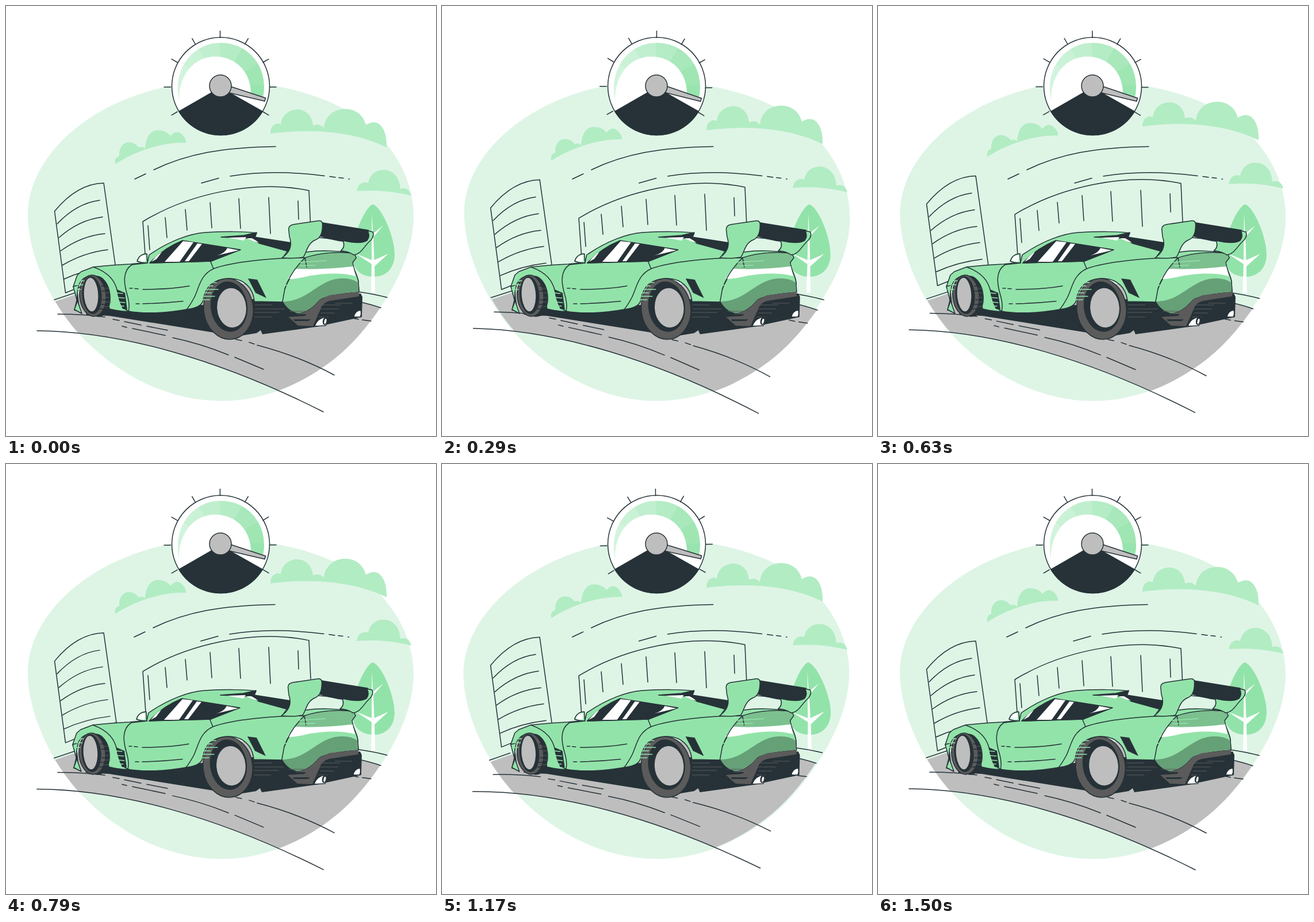
An HTML page for the animation above (1.54 s loop, 748x748 px).

```html
<!DOCTYPE html>
<html lang="en">
<head>
<meta charset="utf-8">
<title>Fast car</title>
<style>
html, body { margin: 0; width: 100%; height: 100%; overflow: hidden; background: #fff; }
svg { display: block; width: 100%; height: 100%; }
.line { fill: none; stroke: #263238; stroke-width: 1.5; stroke-linecap: round; stroke-linejoin: round; }
.edge { stroke: #263238; stroke-width: 1.5; stroke-linejoin: round; }
.dark { fill: #263238; }
.green { fill: #92e3a9; }
.mid { fill: #7cc08f; }
.deep { fill: #66a077; }
.cloud { fill: #b2ecc3; }
.grey { fill: #bebebe; }
.iron { fill: #5b5b5b; }
.white { fill: #fff; }
.glint { fill: none; stroke: #92e3a9; stroke-width: 1.3; stroke-linecap: round; }
.scratch { fill: none; stroke: #5b5b5b; stroke-width: 1.2; stroke-linecap: round; }
</style>
</head>
<body>
<svg viewBox="0 0 748 748">
  <defs>
    <path id="blobShape" d="M38 362C38 290 95 215 190 170C260 138 320 131 376 131C450 131 530 147 590 180C665 221 709 295 709 365C709 420 685 475 651 525C620 570 590 602 552 628C500 664 440 687 374 687C280 687 190 640 125 568C75 512 38 430 38 362Z"/>
    <clipPath id="blobClip"><use href="#blobShape"/></clipPath>
    <clipPath id="bandClip"><path d="M301 166C289 110 325 64 373 64C418 64 449 99 449 140Q449 153 446 163L426 156C428 118 402 88 364 88C326 88 300 121 301 166Z"/></clipPath>
  </defs>

  <use id="blob" href="#blobShape" fill="#def5e6"/>

  <g id="sky">
    <g class="cloud">
      <path d="M190 275Q188 263 197 261C196 247 203 237 214 237Q224 237 231 246Q237 243 242 248C243 226 253 216 264 216Q279 216 286 226Q296 214 306 223Q313 230 313.500 238C275 236 225 252 190 275Z"/>
      <path d="M460 222Q460 208 470 205Q474 203 478 206C480 187 495 180 507 180C520 180 533 190 534 208Q545 203 553 212C555 190 572 179 590 179C608 179 622 190 626 207Q640 198 650 206Q663 218 662 246C600 215 520 214 460 222Z"/>
      <path d="M610 322Q612 309 622 307Q627 306 630 308C633 292 645 285 657 285C672 285 685 297 686 318Q701 314 705 330C670 321 640 320 610 322Z"/>
    </g>
    <g class="line">
      <path d="M190 464L103.500 499L84.500 357Q124 309 170 308L192 464"/>
      <path d="M89 379Q123 343 163 338M92 403Q127 372 168 367M95 426Q131 400 172 396M98 451Q135 429 177 424M101 475Q138 458 181 453"/>
      <path d="M243 446L238 375C315 328 430 301 527 321L530 388"/>
      <path d="M247 382L250 424M277 368L280 403M312 354L315 390M355 342L358 386M405 335L408 387M457 333L460 396M508 339L509 371"/>
    </g>
  </g>

  <g id="tree">
    <path class="green" d="M638 345C654 350 676 402 676 432C676 457 660 471 640 471C616 471 603 457 602 435C602 402 624 350 638 345Z"/>
    <path class="white" d="M636.500 361L638.500 396L656 382L639 402L640.500 442L665 431L641 453L642 499L635 499L636 449L609 431L636 442Z"/>
  </g>

  <g id="road">
    <g clip-path="url(#blobClip)">
      <path class="grey" d="M80 516L118 503Q200 480 374 480Q540 490 660 527L660 640L552 706C372 615 200 566 54 565Z"/>
    </g>
    <g class="line">
      <path d="M84 511L120 499M612 497Q640 501 663 507M612 514Q635 519 652 525"/>
      <path d="M90 536Q135 536 172 541M54 565C200 566 372 615 552 706"/>
      <path d="M186 545L197 547M206 549L235 555M245 557L281 564"/>
      <path d="M202 557L210 559M220 561L277 573M290 577Q338 587 387 607M398 611L448 632"/>
      <path d="M400 580L410 582M423 585L432 588M437 590Q510 609 571 642M603 543L613 545M620 546L635 548"/>
    </g>
  </g>

  <g id="car">
    <g class="line">
      <path d="M224 301L243 292M257 285C315 257 376 246 469 244.500"/>
      <path d="M340 308L370 299.500M390 296Q465 284 554 295.500M563 296.500L573 298M579 298.500L587 299.500M596 301L597.500 301"/>
    </g>

    <path class="dark" d="M135 515L180 524L345 520L430 510L500 514L617 500L620 506L619 541L540 558L446 571L443 564L436 569L400 575L355 567L180 539L140 537Z"/>

    <path class="green edge" d="M124 468L131 462L152 454Q190 450 216 449L246 446L249 433C285 408 320 396 346 394C380 392 420 392 436 395L433 402L490 426L482 437Q505 430 523 428C550 424 585 426 606 431L609 438L603 446C604 459 612 469 613 480L614 498L550 508Q520 520 482 515L432 514C430 490 414 475 391 474C360 473 346 490 343 512C340 522 330 526 313 528C280 534 240 536 213 531C198 532 190 529 180 527L176 505C174 480 162 469 148 470C132 470 125 483 124 500L128 531L119 529L124 508L117 488Z"/>

    <path class="line" d="M152 454C180 464 190 479 194 497Q200 527 214 531M246 447L219 450C202 461 205 483 211 503Q216 520 213 531M356 445L361 457C337 468 336 491 327 508Q320 521 314 528M361 457C393 445 462 438 520 438"/>
    <path class="line" d="M215 491L220 491M224 491.500L230 492M238 493Q285 493 319 487M226 518L232 518M238 518Q275 517 308 513.500"/>

    <path class="green edge" d="M117 488L127 485Q121 505 126 518L132 535L119 528L124 514Z"/>
    <path class="dark" d="M193 493L207 499L211 528L203 527Q195 512 193 493Z"/>
    <path class="glint" d="M191 499L203 500M193 507L206 508M196 515L207 516M199 522L205 522"/>
    <path class="dark" d="M421 474L437 476L453 508L434 499Z"/>

    <!-- cabin -->
    <path class="dark edge" d="M250 447C265 431 285 417 307 408L408 424L357 444Z"/>
    <g class="white">
      <path d="M276 445L308 409L326 411L302 445ZM311 444L333 413L341 414L318 444ZM385 421L405 425L367 434Q381 430 385 421Z"/>
      <path d="M253 445Q263 432 271 428L262 440Z"/>
    </g>
    <path class="line" d="M250 447L357 444"/>
    <path class="dark edge" d="M374 402L414 399L436 394L433 402L497 412L492 427L441 413L425 404Z"/>
    <path class="white" d="M386 403L418 402L414 408ZM419 404L428 404Q434 407 440 412L430 409Z"/>
    <path class="green edge" d="M228 444Q232 431 245 431L246 447Q235 447 228 444Z"/>
    <path class="white" d="M230 443Q233 433 243 433L243 444Q236 446 230 443Z"/>

    <!-- tail -->
    <path class="green edge" d="M520 438C550 428 585 427 606 431L609 438L603 446C604 459 612 469 613 480L614 498Q562 501 546 511Q527 534 507 535Q490 530 481 514L485 492Q496 464 520 438Z"/>
    <path class="mid" d="M520 439C551 429 585 428 606 432L608 438L602 446L604 454Q554 461 503 457Q510 447 520 439Z"/>
    <path class="white" d="M503 457C540 459 576 456 604 453L608 470C585 463 550 465 525 470Q505 475 490 475Z"/>
    <path class="deep" d="M482 514C522 514 540 482 573 475Q598 471 612 481L613 497Q562 500 545 511Q526 533 507 534Q490 530 482 514Z"/>
    <path class="line" d="M520 438L523 454M485 492Q495 462 520 438"/>
    <path class="glint" d="M508 446L557 443M512 452L538 451M484 486L500 485"/>
    <path class="iron" d="M489 539L508 535Q527 534 546 511L563 503L614 497L614 505L563 513Q550 516 546 530L534 557L508 556Z"/>
    <path class="dark" d="M489 536L523 536L520 539L489 541ZM500 545L530 545L526 548L502 548Z"/>
    <path class="scratch" d="M433 520H463M434 527H484M432 533H475M433 541H462M494 531H539M548 520H582M547 527H578M548 534H571M573 517H602M545 541H560"/>
    <path class="white edge" d="M537 557Q542 542 558 541Q562 548 556 556Z"/>
    <ellipse class="dark" cx="555" cy="548" rx="4" ry="7" transform="rotate(12 555 548)"/>
    <ellipse class="white" cx="555.500" cy="548.500" rx="1.800" ry="4.500" transform="rotate(12 555.500 548.500)"/>
    <path class="white edge" d="M605 541Q607 530 617 529Q619 536 616 541Z"/>

    <!-- wing -->
    <path class="dark edge" d="M550 377L630 390Q635 394 632 404Q628 411 615 412Q575 410 546 400Z"/>
    <path class="green edge" d="M629 391L638 393Q641 399 635 407C622 418 619 431 605 433Q594 426 582 426Q591 419 586 408Q618 415 628 408Q634 400 629 391Z"/>
    <path class="green edge" d="M492 391Q490 382 500 380L541 374Q550 372 550.500 379C551 394 547 404 538 407C524 413 523 429 517 437Q500 440 480 438C495 428 498 415 493 401Z"/>
    <path class="line" d="M545 403Q570 405 586 408"/>

    <!-- wheels -->
    <ellipse class="dark edge" cx="159" cy="505" rx="22" ry="35" transform="rotate(-5 159 505)"/>
    <ellipse class="iron edge" cx="151" cy="504" rx="23" ry="36" transform="rotate(-5 151 504)"/>
    <ellipse class="dark" cx="149.500" cy="503" rx="17" ry="33" transform="rotate(-4 149.500 503)"/>
    <ellipse class="grey edge" cx="148" cy="502" rx="13" ry="30" transform="rotate(-3 148 502)"/>
    <path class="scratch" d="M172 491H179M173 499H181M174 507H180M173 515H182M172 523H180"/>
    <path class="line" d="M166 487H174M167 496H176M168 511H177M166 519H175M163 527H172"/>
    <path class="glint" d="M122 485H134M119 493H130M124 478H136"/>

    <ellipse class="iron edge" cx="387" cy="527" rx="43" ry="53" transform="rotate(-7 387 527)"/>
    <ellipse class="dark" cx="388" cy="523" rx="32" ry="44" transform="rotate(-7 388 523)"/>
    <ellipse class="grey edge" cx="392.500" cy="525" rx="26" ry="35" transform="rotate(-4 392.500 525)"/>
    <path class="glint" d="M348 481H366M344 487H360M347 493H369M340 499H357M344 505H363M339 511H354"/>
  </g>

  <!-- gauge -->
  <circle class="white edge" cx="373.500" cy="139.500" r="85"/>
  <g id="band" clip-path="url(#bandClip)"></g>
  <path class="dark" d="M300 183L373 141L447 183A85 85 0 0 1 300 183Z"/>
  <path id="ticks" class="line"/>
  <path id="needle" class="grey edge" d="M389 139.500L451.500 160L450 165.500L386 150.500Z"/>
  <circle class="grey edge" cx="373" cy="139" r="19"/>
</svg>
<script>
const LOOP = 1540, CYCLE = 1500, STEP = 1000 / 24;
const el = id => document.getElementById(id);
const polar = (cx, cy, r, deg) => {
  const a = deg * Math.PI / 180;
  return (cx + r * Math.cos(a)).toFixed(1) + ' ' + (cy - r * Math.sin(a)).toFixed(1);
};

function buildGauge() {
  let ticks = '';
  for (let a = -30; a <= 210; a += 30) {
    ticks += 'M' + polar(372.5, 141, 86, a) + 'L' + polar(372.5, 141, 97.5, a);
  }
  el('ticks').setAttribute('d', ticks);

  const shades = ['#98e4ae', '#9fe6b3', '#a8e8bb', '#b4ecc5', '#c0efcf', '#caf2d6', '#d2f4dd', '#d8f5e1'];
  shades.forEach((fill, i) => {
    const a = i * 30 - 30;
    const wedge = document.createElementNS('http://www.w3.org/2000/svg', 'path');
    wedge.setAttribute('d', 'M373 139L' + polar(373, 139, 110, a) + 'L' + polar(373, 139, 110, a + 30.5) + 'Z');
    wedge.setAttribute('fill', fill);
    el('band').prepend(wedge);
  });
}

// cubic-bezier(.36, .07, .19, .97)
function ease(x) {
  const curve = (s, p, q) => 3 * s * (1 - s) * (1 - s) * p + 3 * s * s * (1 - s) * q + s * s * s;
  let lo = 0, hi = 1;
  for (let i = 0; i < 20; i++) {
    const s = (lo + hi) / 2;
    if (curve(s, .36, .19) < x) lo = s; else hi = s;
  }
  return curve(lo, .07, .97);
}

const stops = Array.from({ length: 11 }, (_, i) => i % 10 === 0 ? 0 : i % 2 ? -3.5 : 2.8);

function shake(p) {
  const i = Math.min(9, Math.floor(p * 10));
  return stops[i] + (stops[i + 1] - stops[i]) * ease(p * 10 - i);
}

const sway = p => Math.asin(Math.sin(2 * Math.PI * p)) * 2 / Math.PI;
const float = p => -14.96 * (1 - Math.abs(1 - 2 * p));
const pivots = { blob: '374 409', road: '359 602', tree: '638 421', ticks: '373 117', needle: '420 152' };

function draw(ms) {
  const time = Math.floor((ms % LOOP + 6) / STEP) * STEP;
  const p = Math.min(time / CYCLE, 1);
  const angle = sway(p).toFixed(4);
  for (const id in pivots) el(id).setAttribute('transform', `rotate(${angle} ${pivots[id]})`);
  el('sky').setAttribute('transform', `translate(0 ${float(p).toFixed(3)})`);
  el('car').setAttribute('transform', `translate(${shake(p).toFixed(3)} 0)`);
}

buildGauge();
const start = performance.now();
function tick() {
  draw(performance.now() - start);
  requestAnimationFrame(tick);
}
tick();
</script>
</body>
</html>
```
